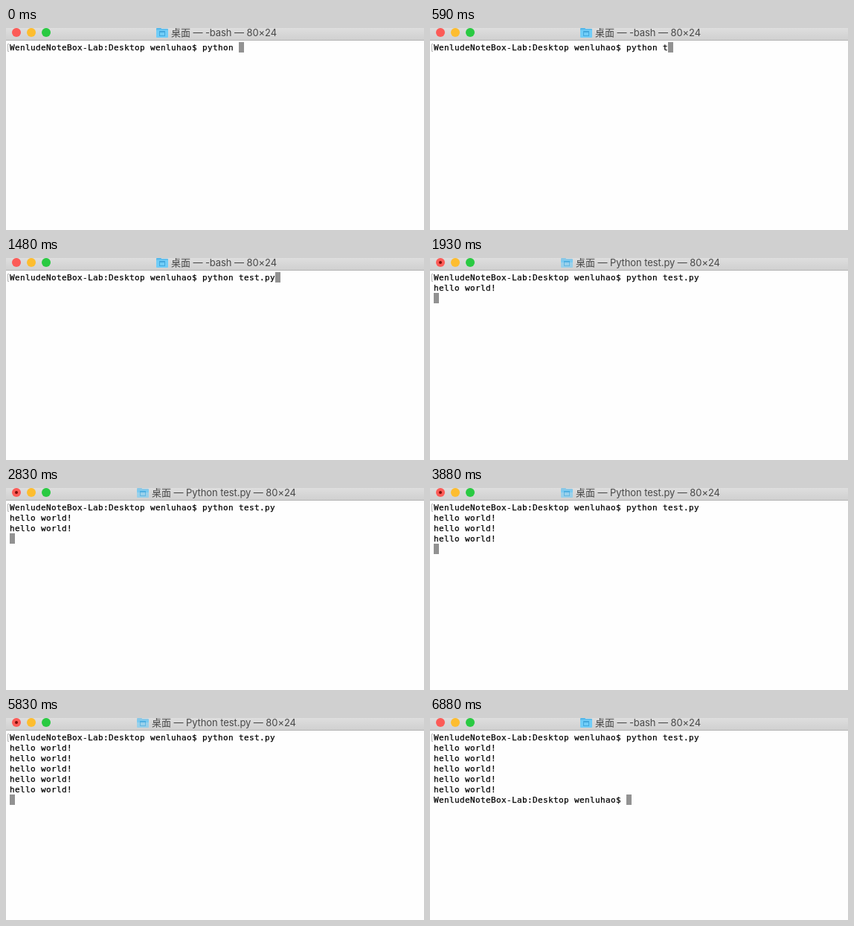
An HTML page with a canvas that plays this animation: 562 by 272 pixels, repeating every 8.97 s.

```html
<!DOCTYPE html>
<html lang="zh">
<head>
<meta charset="utf-8">
<style>
html, body { margin: 0; width: 100%; height: 100%; overflow: hidden; background: #fefefe; }
canvas { display: block; }
</style>
</head>
<body>
<canvas id="stage" width="562" height="272"></canvas>
<script>
const ctx = document.getElementById('stage').getContext('2d');
const LOOP = 8970, CELL = 7, ROW = 14, LEFT = 5, TOP = 19;
const PROMPT = 'WenludeNoteBox-Lab:Desktop wenluhao$ ';
const COMMAND = 'test.py';
// [time, characters of the command typed so far]
const KEYS = [[590, 1], [740, 2], [880, 4], [1180, 5], [1330, 6], [1480, 7]];
const PRINTS = [1780, 2830, 3880, 4780, 5830];
const RUN = 1930, DONE = 6880;

function rect(color, x, y, w, h) {
  ctx.fillStyle = color;
  ctx.fillRect(x, y, w, h);
}

function dot(color, x, y, r) {
  ctx.fillStyle = color;
  ctx.beginPath();
  ctx.arc(x, y, r, 0, 7);
  ctx.fill();
}

function folder(x, busy) {
  ctx.globalAlpha = busy ? 0.6 : 1;
  ctx.fillStyle = '#58b9ea';
  ctx.beginPath();
  ctx.roundRect(x, 0, 7, 5, 1);
  ctx.roundRect(x, 1, 16, 5, 1);
  ctx.fill();
  ctx.fillStyle = '#70cdf8';
  ctx.beginPath();
  ctx.roundRect(x, 2.5, 16, 10.5, 1);
  ctx.fill();
  ctx.strokeStyle = '#42a7dc';
  ctx.lineWidth = 1;
  ctx.strokeRect(x + 4.5, 4.5, 7, 6);
  rect('#42a7dc', x + 4, 4, 8, 2);
  ctx.globalAlpha = 1;
}

function titleBar(busy) {
  const shade = ctx.createLinearGradient(0, 0, 0, 16);
  shade.addColorStop(0, '#dedede');
  shade.addColorStop(1, '#d0d0d0');
  rect(shade, 0, 0, 562, 16);
  rect('#b4b4b4', 0, 16, 562, 1);
  ['#fc5b57', '#fdbd2f', '#2aca42'].forEach((c, i) => dot(c, 14 + 20 * i, 6, 6));
  if (busy) dot('#7a0c08', 14, 6, 2);

  const x = busy ? 196 : 222;
  folder(x - 20, busy);
  ctx.font = '13px Inter, "Noto Sans CJK SC", "Noto Sans CJK", sans-serif';
  ctx.letterSpacing = '-0.08px';
  ctx.fillStyle = '#484848';
  ctx.fillText(`桌面 — ${busy ? 'Python test.py' : '-bash'} — 80×24`, x, 11);
  ctx.letterSpacing = '0px';
}

function terminal(lines) {
  ctx.strokeStyle = '#b0b0b0';
  ctx.lineWidth = 1;
  ctx.beginPath();
  ctx.moveTo(4, 21.5);
  ctx.lineTo(2.5, 21.5);
  ctx.lineTo(2.5, 31.5);
  ctx.lineTo(4, 31.5);
  ctx.stroke();

  const last = lines.length - 1;
  rect('#929292', LEFT + CELL * lines[last].length, TOP + ROW * last, CELL, ROW);

  ctx.font = '11px "DejaVu Sans Mono", monospace';
  ctx.fillStyle = ctx.strokeStyle = '#000';
  ctx.lineWidth = 0.25;
  lines.forEach((line, row) => [...line].forEach((ch, col) => {
    const x = LEFT + CELL * col, y = TOP + ROW * row + 11;
    ctx.fillText(ch, x, y);
    ctx.strokeText(ch, x, y);
  }));
}

function draw(now) {
  const t = now % LOOP;
  const typed = KEYS.reduce((n, [at, count]) => t >= at ? count : n, 0);
  const lines = [PROMPT + 'python ' + COMMAND.slice(0, typed)];
  for (const at of PRINTS) if (t >= at) lines.push('hello world!');
  if (t >= DONE) lines.push(PROMPT);
  else if (t >= PRINTS[0]) lines.push('');

  rect('#fefefe', 0, 0, 562, 272);
  titleBar(t >= RUN && t < DONE);
  terminal(lines);
}

const start = performance.now();
function tick() {
  draw(performance.now() - start);
  requestAnimationFrame(tick);
}
tick();
</script>
</body>
</html>
```
